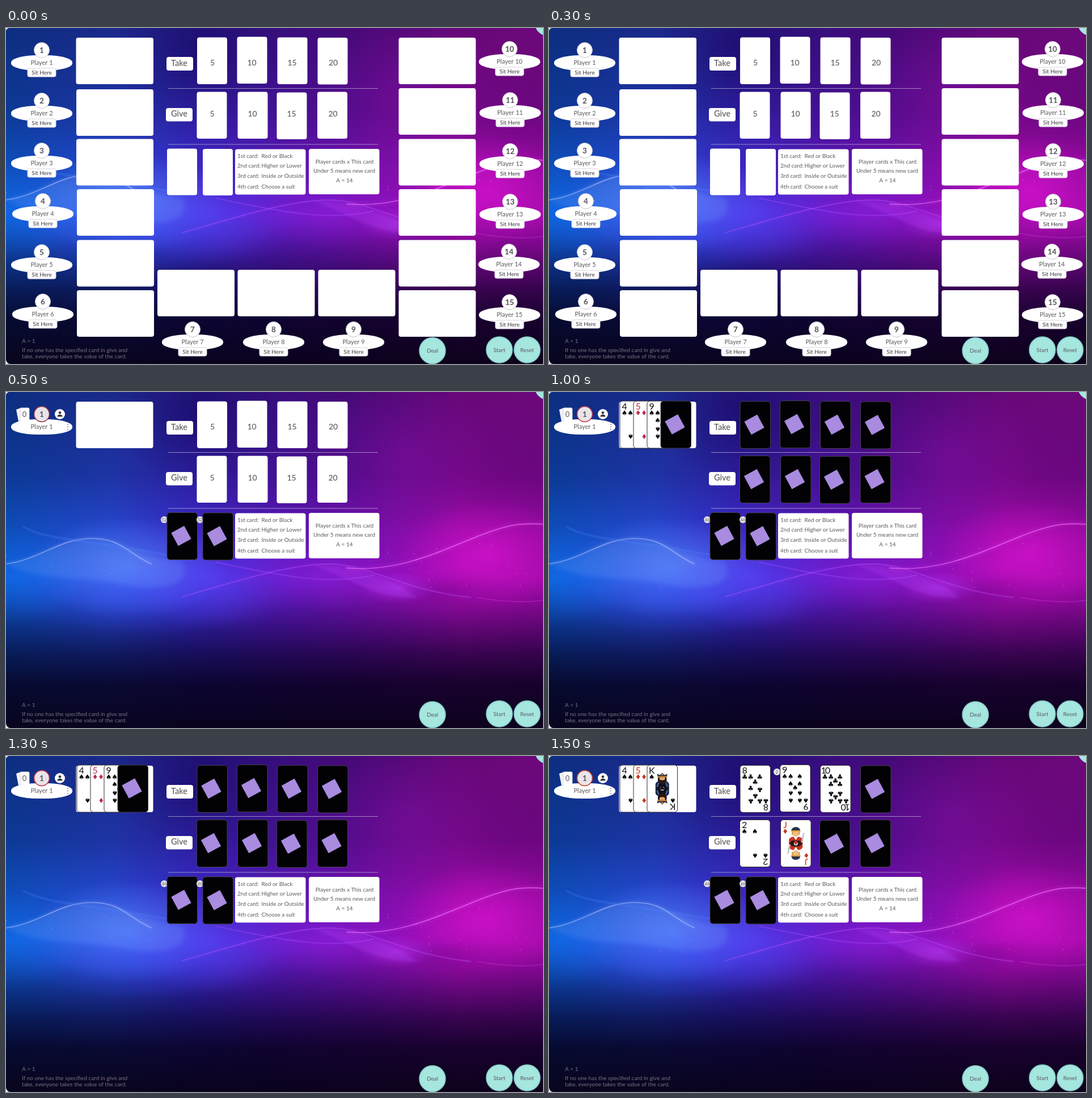
An HTML page with a canvas for the animation above (2000 ms loop, 947x592 px).

```html
<!DOCTYPE html>
<html lang="en">
<head>
<meta charset="utf-8">
<title>Card table</title>
<style>
html, body { margin: 0; width: 100%; height: 100%; overflow: hidden; background: #08021a; }
canvas { display: block; }
</style>
</head>
<body>
<canvas id="stage" width="947" height="592"></canvas>
<script>
const W = 947, H = 592, GREY = '#5c5a5e';
const ctx = document.getElementById('stage').getContext('2d');
const backdrop = document.createElement('canvas');
backdrop.width = W;
backdrop.height = H;

function paintBackdrop(g) {
  const linear = (x, y, stops) => {
    const fill = g.createLinearGradient(0, 0, x, y);
    stops.forEach(([at, color]) => fill.addColorStop(at, color));
    g.fillStyle = fill;
    g.fillRect(0, 0, W, H);
  };
  const glow = (x, y, rx, ry, rgb, alpha) => {
    g.save();
    g.translate(x, y);
    g.scale(rx, ry);
    const fill = g.createRadialGradient(0, 0, 0, 0, 0, 1);
    fill.addColorStop(0, `rgba(${rgb},${alpha})`);
    fill.addColorStop(.5, `rgba(${rgb},${alpha * .45})`);
    fill.addColorStop(1, `rgba(${rgb},0)`);
    g.fillStyle = fill;
    g.fillRect(-1, -1, 2, 2);
    g.restore();
  };
  const wave = (path, color, width, blur) => {
    g.strokeStyle = g.shadowColor = color;
    g.lineWidth = width;
    g.shadowBlur = blur;
    g.stroke(new Path2D(path));
    g.shadowBlur = 0;
  };
  const sheet = (path, color, blur) => {
    g.save();
    g.filter = `blur(${blur}px)`;
    g.fillStyle = color;
    g.fill(new Path2D(path));
    g.restore();
  };

  linear(W, 0, [[0, '#0e5cd2'], [.2, '#2c52ea'], [.35, '#432fe0'], [.5, '#641cce'],
    [.65, '#8412c2'], [.85, '#b40cba'], [1, '#a80aae']]);
  linear(0, H, [[0, 'rgba(10,0,44,.5)'], [.25, 'rgba(8,0,50,.38)'], [.42, 'rgba(8,0,50,.14)'],
    [.55, 'rgba(8,0,50,.04)'], [.62, 'rgba(6,0,44,.2)'], [.7, 'rgba(4,0,40,.46)'],
    [.78, 'rgba(4,0,34,.7)'], [.87, 'rgba(5,0,28,.89)'], [1, 'rgba(8,2,24,.97)']]);
  glow(340, 40, 150, 130, '16,0,80', .4);
  glow(930, 10, 240, 140, '150,16,150', .3);
  glow(790, 345, 100, 35, '70,0,110', .25);
  glow(215, 310, 180, 90, '100,150,255', .6);
  glow(240, 355, 230, 75, '60,80,255', .45);
  glow(20, 325, 120, 85, '20,120,255', .45);
  glow(370, 335, 150, 85, '100,70,255', .45);
  glow(850, 285, 160, 95, '225,20,215', .6);
  glow(690, 345, 70, 28, '190,60,255', .5);
  glow(560, 325, 170, 60, '160,40,240', .35);
  glow(710, 110, 150, 150, '150,20,180', .3);

  sheet('M0 303C60 295 95 258 150 258S215 285 310 300C335 345 260 352 200 338S60 335 0 303Z',
    'rgba(120,165,255,.22)', 4);
  sheet('M540 305C630 303 690 335 725 362C650 366 610 328 540 305Z', 'rgba(175,60,240,.32)', 2);
  wave('M0 303C60 295 95 258 150 258S215 285 257 303', 'rgba(190,205,255,.7)', 1.2, 5);
  wave('M30 237C70 262 160 262 300 290', 'rgba(80,140,255,.2)', 4, 10);
  wave('M600 310C690 318 760 283 830 255S920 232 947 233', 'rgba(240,110,255,.75)', 1.5, 7);
  wave('M310 361C400 335 500 303 570 303S700 350 820 362', 'rgba(190,85,255,.5)', 1.4, 6);
  wave('M370 300C450 315 560 345 650 322', 'rgba(170,80,255,.35)', 2, 7);
  wave('M830 362Q900 374 947 367', 'rgba(220,60,230,.45)', 1.2, 4);

  let seed = 7;
  const random = () => (seed = seed * 16807 % 2147483647) / 2147483647;
  for (let i = 0; i < 42; i++) {
    const x = i % 3 ? 650 + random() * 290 : random() * 340;
    g.fillStyle = `rgba(245,190,255,${.15 + random() * .5})`;
    g.fillRect(x, 265 + random() * 85, 1.2, 1.2);
  }
}

function box(x, y, w, h, r = 4, fill = '#fff', stroke) {
  ctx.beginPath();
  ctx.roundRect(x, y, w, h, r);
  ctx.fillStyle = fill;
  ctx.fill();
  if (stroke) {
    ctx.strokeStyle = stroke;
    ctx.lineWidth = 1;
    ctx.stroke();
  }
}

function disc(x, y, r, fill = '#fff', stroke, width = 1) {
  ctx.beginPath();
  ctx.arc(x, y, r, 0, 7);
  ctx.fillStyle = fill;
  ctx.fill();
  if (stroke) {
    ctx.strokeStyle = stroke;
    ctx.lineWidth = width;
    ctx.stroke();
  }
}

function shape(path, fill) {
  ctx.fillStyle = fill;
  ctx.fill(new Path2D(path));
}

function text(s, x, y, size = 10, color = GREY, align = 'center', weight = 400) {
  ctx.font = `${weight} ${size}px Lato, sans-serif`;
  ctx.textAlign = align;
  ctx.textBaseline = 'middle';
  ctx.fillStyle = color;
  ctx.fillText(s, x, y + .5);
}

// Runs draw twice: upright and turned half round the point.
function mirrored(x, y, draw) {
  for (const angle of [0, Math.PI]) {
    ctx.save();
    ctx.translate(x, y);
    ctx.rotate(angle);
    draw();
    ctx.restore();
  }
}

function cardBack(x, y) {
  box(x, y, 53.5, 83, 5, '#020103', '#45404a');
  ctx.save();
  ctx.translate(x + 25, y + 41);
  ctx.rotate(-.5);
  ctx.fillStyle = '#a98be0';
  ctx.fillRect(-13, -13, 26, 26);
  ctx.restore();
}

function pip(suit, x, y, color) {
  ctx.font = '12px "DejaVu Sans", sans-serif';
  ctx.textAlign = 'center';
  ctx.textBaseline = 'middle';
  ctx.fillStyle = color;
  ctx.fillText(suit, x, y);
}

function king() {
  shape('M-12 0V-8Q-11 -14 0 -14T12 -8V0Z', '#1d2747');
  shape('M-11 0L-4 -13H4L11 0Z', '#0d0d16');
  shape('M-10 -4L-7 -11L-5 -10L-8 -2Z M10 -4L7 -11L5 -10L8 -2Z', '#4a64a0');
  disc(0, -16, 8, '#17131a');
  disc(0, -18, 5, '#e7a66f');
  shape('M-7 -18Q-6 -8 0 -7Q6 -8 7 -18L3 -15H-3Z', '#2a1712');
  shape('M-8 -20L-9 -26L-4 -24L0 -28L4 -24L9 -26L8 -20Z', '#27334f');
  shape('M-8 -22H8V-20H-8Z M-2 -25L0 -27L2 -25L0 -23Z', '#d58a2c');
}

function jack() {
  shape('M-12 0V-7Q-10 -12 0 -12T12 -7V0Z', '#c63420');
  shape('M-12 0L-7 -5H7L12 0Z', '#34151a');
  shape('M-4 -12H4L0 -6Z', '#fff');
  shape('M9 -2L13 -18L15 -19L12 -1Z', '#b9b9c2');
  disc(0, -18, 6, '#f0bd8b');
  shape('M-7 -15V-21H-5V-15Z M7 -15V-21H5V-15Z', '#d79a35');
  shape('M-8 -21Q-8 -29 1 -29Q8 -28 8 -21Z', '#27334f');
  shape('M-8 -23H8V-21H-8Z', '#d79a35');
}

const COURT = { K: king, J: jack };
// Pips of the upper half, measured from the card's centre; the lower half mirrors them.
const PIPS = {
  2: [[0, -20]],
  4: [[-8, -20], [8, -20]],
  5: [[-8, -20], [8, -20]],
  8: [[-8, -20], [8, -20], [0, -11], [-8, 0]],
  9: [[-8, -20], [8, -20], [-8, -7], [8, -7]],
  10: [[-8, -20], [8, -20], [0, -13], [-8, -7], [8, -7]]
};

function cardFace(x, y, rank, suit, red) {
  const color = suit === '♦' ? red : '#111';
  const cx = x + 26.75, cy = y + 41.5;
  box(x, y, 53.5, 83, 5, '#fff', '#302c36');
  mirrored(cx, cy, () => {
    ctx.letterSpacing = rank === 10 ? '-2px' : '0px';
    text(rank, -18.5, -32, 16, color);
    ctx.letterSpacing = '0px';
    pip(suit, -18.5, -20, color);
    if (COURT[rank]) COURT[rank]();
    else PIPS[rank].forEach(([px, py]) => pip(suit, px, py, color));
  });
  if (rank === 5 || rank === 9) pip(suit, cx, cy, color);
  if (COURT[rank]) {
    disc(cx, cy, 4.5, '#fff', '#17141d', 2);
    pip(suit, cx, cy, color);
  }
}

const nameplate = (cx, cy) => box(cx - 54, cy - 13.5, 108, 27, { x: 46, y: 12.5 });

function emptySeat(n, x, y) {
  nameplate(x, y + 22.5);
  disc(x, y, 13.5, '#fff', '#c9c4d0');
  text(n, x, y, 13.5, '#55525a', 'center', 700);
  text('Player ' + n, x, y + 22, 11);
  box(x - 25, y + 32, 50, 15, 3, '#fff', '#d8d4de');
  text('Sit Here', x, y + 39, 10, '#3c3a40');
}

function takenSeat(ring) {
  shape('M18 31L26 28L30 50L22 52Z', '#f4f2f6');
  box(25, 28, 16, 24, 2, '#fff', '#dcd8e0');
  text('0', 32.5, 40, 13);
  nameplate(63, 61.5);
  disc(63, 39, 13.5, '#e9e4e9', ring, 1.6);
  text('1', 63, 39, 13.5, '#55525a', 'center', 700);
  text('Player 1', 63, 61, 11);
  disc(95, 39, 9);
  disc(95, 36.5, 2.3, '#333');
  shape('M90.5 43.5Q90.5 39.7 95 39.7T99.5 43.5Z', '#333');
  [57, 61.5, 66].forEach(y => disc(109, y, .9, '#777'));
}

function countBadge(x, y, n) {
  disc(x, y, 6, '#e6e2ea');
  text(n, x, y, 7.5, '#666');
}

const SEATS = [[63, 39], [63, 128], [63, 216], [65, 305], [63, 395], [65, 482],
  [329, 531], [472, 531], [613, 531],
  [888, 37], [889, 127], [889, 217], [889, 306], [887, 394], [888, 483]];
const TAKE = [[337, 16.5], [407.5, 15.5], [478.5, 16.5], [549.5, 17]];
const GIVE = [[336.5, 112.5], [408.5, 112.5], [477.5, 113.5], [549, 112.5]];
const PILES = [[284, 212.5], [347, 213]];
const VALUES = [5, 10, 15, 20];
const RULES = ['Red or Black', 'Higher or Lower', 'Inside or Outside', 'Choose a suit'];
const ORDINALS = ['1st', '2nd', '3rd', '4th'];

function drawTable() {
  ctx.drawImage(backdrop, 0, 0);
  shape('M0 584Q1 591 7 592H0Z M0 0H5Q1 1 0 5Z', '#fff');
  disc(956, -10, 24, '#a5e6df');

  ctx.fillStyle = 'rgba(205,200,225,.65)';
  ctx.fillRect(286, 106, 370, 1);
  ctx.fillRect(286, 204.5, 370, 1);
  box(283, 51, 47, 24);
  text('Take', 305.5, 62, 14.5, GREY, 'center', 500);
  box(282, 141, 47, 23.5);
  text('Give', 305.5, 151.5, 14.5, GREY, 'center', 500);

  box(404, 213.5, 124.5, 80);
  RULES.forEach((rule, i) => {
    const y = [225, 242, 260, 279][i];
    text(ORDINALS[i] + ' card:', 408, y, 10, GREY, 'left');
    text(rule, 450.5, y, 10, GREY, 'left');
  });
  box(534, 213, 124.5, 80);
  text('Player cards x This card', 597, 235.5);
  text('Under 5 means new card', 596.5, 251);
  text('A = 14', 597, 268);

  const dim = '#77717f';
  text('A = 1', 28, 551, 10, dim, 'left');
  text('If no one has the specified card in give and', 28, 567, 10, dim, 'left');
  text('take, everyone takes the value of the card.', 28, 578, 10, dim, 'left');
  [['Deal', 752, 568.5], ['Start', 870, 567], ['Reset', 919, 567]].forEach(([label, x, y]) => {
    disc(x, y, 23, '#a5e6df', '#84c8c8', 1.5);
    text(label, x, y);
  });
}

function drawScene(phase) {
  drawTable();
  const red = phase === 3 ? '#c4391d' : '#b8304a';

  box(123.5, 17, 136, 82);
  if (phase === 0) {
    [17, 108, 195.5, 284, 373.5, 462].forEach((y, i) => box(i < 3 ? 124 : 125, y, 136, 82));
    [17, 106, 195.5, 284, 373.5, 462].forEach(y => box(692.5, y, 136, 82));
    [267, 408.5, 550.5].forEach(x => box(x, 426, 136, 82));
    SEATS.forEach(([x, y], i) => emptySeat(i + 1, x, y));
    PILES.forEach(([x, y]) => box(x, y, 53, 82));
  } else {
    takenSeat(['#8f3348', '#bd3449', '#c2432c'][phase - 1]);
    PILES.forEach(([x, y]) => {
      countBadge(x - 5, 225, phase === 1 ? 52 : 46);
      cardBack(x, y);
    });
  }

  if (phase < 2) {
    [TAKE, GIVE].forEach((row, r) => row.forEach(([x, y], i) => {
      box(x, y, 53, 82.5);
      text(VALUES[i], x + [27, 26, 26, 27.5][i], (r ? 151 : 61.5), 14, GREY, 'center', 500);
    }));
    return;
  }

  cardFace(125, 16, 4, '♠', red);
  cardFace(149, 16, 5, '♦', red);
  if (phase === 2) {
    cardFace(173, 16, 9, '♠', red);
    cardBack(197, 16);
    [...TAKE, ...GIVE].forEach(([x, y]) => cardBack(x, y));
  } else {
    cardFace(173, 16, 'K', '♠', red);
    countBadge(402, 28, 2);
    const open = [[8, '♣'], [9, '♠'], [10, '♣'], null, [2, '♠'], ['J', '♦']];
    [...TAKE, ...GIVE].forEach(([x, y], i) =>
      open[i] ? cardFace(x, y, ...open[i], red) : cardBack(x, y));
  }
}

paintBackdrop(backdrop.getContext('2d'));
const start = performance.now();
let shown = -1;
function tick() {
  const phase = Math.floor((performance.now() - start) % 2000 / 500);
  if (phase !== shown) drawScene(shown = phase);
  requestAnimationFrame(tick);
}
tick();
</script>
</body>
</html>
```
